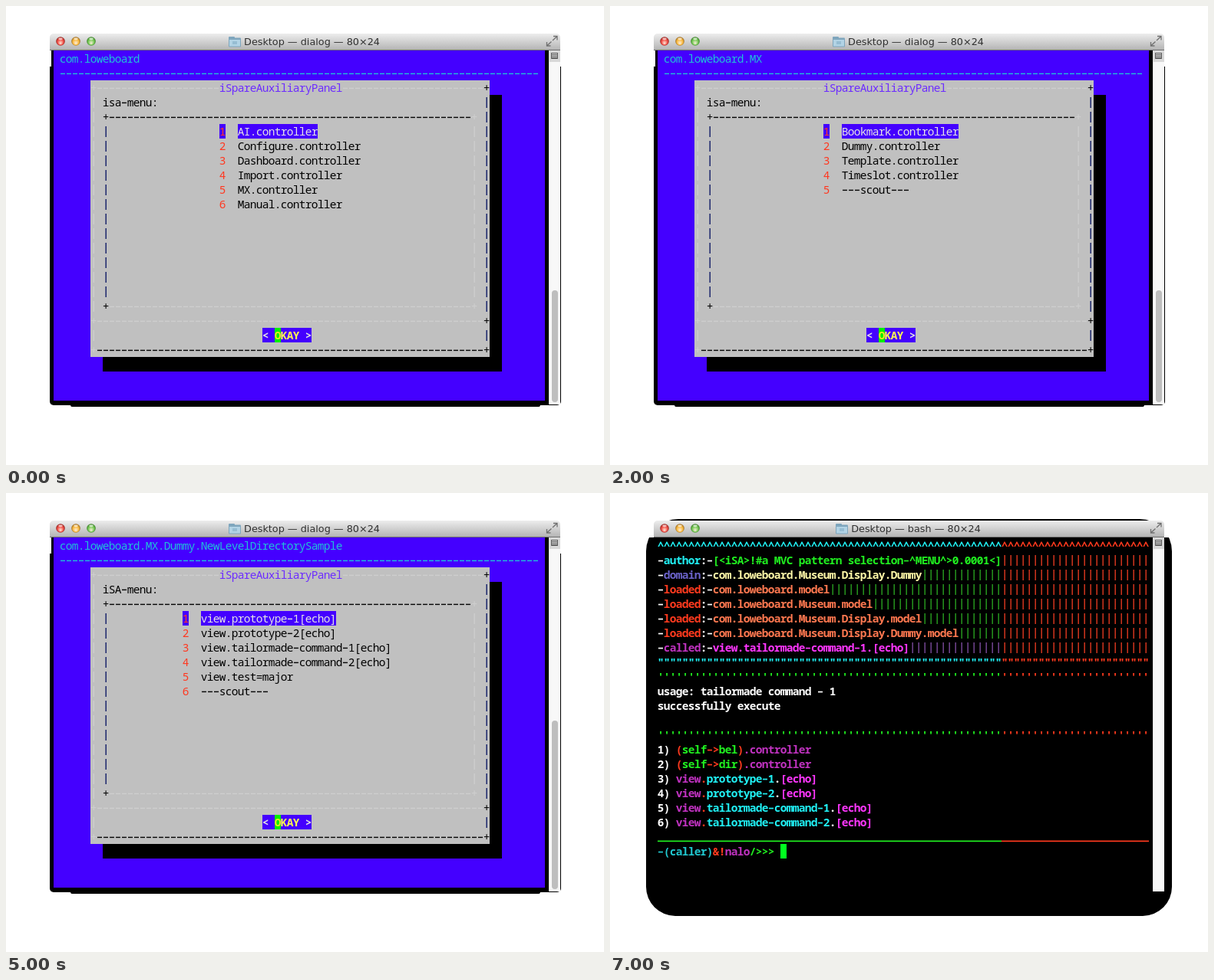
Recreate the animation shown at these times as an HTML page with a canvas. Size 779x599 px, loop 8 s.

```html
<!DOCTYPE html>
<html lang="en">
<head>
<meta charset="utf-8">
<title>Terminal menu</title>
<style>
html, body { margin: 0; width: 100%; height: 100%; overflow: hidden; background: #fff; }
canvas { display: block; width: 779px; height: 599px; }
</style>
</head>
<body>
<canvas id="stage" width="779" height="599"></canvas>
<script>
const ctx = document.getElementById('stage').getContext('2d');
const CELL_W = 8, CELL_H = 19, LEFT = 62, TOP = 59;
const BLUE = '#4400ff', GRAY = '#c0c0c0', FAINT = '#cecece', NAVY = '#101c66', RED = '#ff3820';
const INK = {
  w: '#ffffff', c: '#20f0f4', t: '#20c8d0', g: '#20f020', d: '#28a020', r: '#ff3a1e',
  s: '#ff7850', y: '#fff8a8', b: '#6a62c8', p: '#c032c0', m: '#ff36ff', v: '#7a4a9c'
};

const mainItems = ['AI', 'Configure', 'Dashboard', 'Import', 'MX', 'Manual'].map(n => n + '.controller');
const mxItems = [...['Bookmark', 'Dummy', 'Template', 'Timeslot'].map(n => n + '.controller'), '---scout---'];
const views = ['prototype-1', 'prototype-2', 'tailormade-command-1', 'tailormade-command-2'];
const viewItems = views.map(n => `view.${n}[echo]`);
const root = { path: 'com.loweboard', label: 'isa-menu:', col: 27, thumb: 371, items: mainItems };
const mx = { ...root, path: root.path + '.MX', items: mxItems };
const dummy = {
  path: mx.path + '.Dummy', label: 'iSA-menu:', col: 20, thumb: 297,
  items: ['NewLevelDirectorySample.controller', ...viewItems, '---scout---']
};
const sample = {
  ...dummy, path: dummy.path + '.NewLevelDirectorySample', col: 21,
  items: [...viewItems, 'view.test=major', '---scout---']
};
const steps = [[root, 0], [root, 4], [mx, 0], [mx, 1], [dummy, 0], [sample, 0], [sample, 2], null];

const cellX = col => LEFT + col * CELL_W;
const cellY = row => TOP + row * CELL_H;

function rect(x, y, w, h, color) {
  ctx.fillStyle = color;
  ctx.fillRect(x, y, w, h);
}

function round(x, y, w, h, radii, color) {
  ctx.fillStyle = color;
  ctx.beginPath();
  ctx.roundRect(x, y, w, h, radii);
  ctx.fill();
}

function fillCells(col, row, count, color) {
  rect(cellX(col), cellY(row), count * CELL_W, CELL_H, color);
}

// Places each character in its terminal cell; line characters are drawn as strokes.
function print(col, row, text, color, bold = false) {
  ctx.font = `${bold ? 600 : 400} 14.5px "Noto Sans Mono", "DejaVu Sans Mono", monospace`;
  ctx.textAlign = 'center';
  ctx.textBaseline = 'alphabetic';
  ctx.fillStyle = color;
  [...text].forEach((ch, i) => {
    const x = cellX(col + i), y = cellY(row);
    if (ch === '-') ctx.fillRect(x + 1, y + 9.7, 6, bold ? 1.7 : 1.4);
    else if (ch === '|') ctx.fillRect(x + 3.5, y + 3, 1.4, 14);
    else if (ch === '_') ctx.fillRect(x, y + 14.5, 8, 1.7);
    else if (ch !== ' ') ctx.fillText(ch, x + 4, y + 15);
  });
}

function printInk(row, markup) {
  let col = 0;
  markup.split('{').slice(1).forEach(part => {
    const text = part.slice(2);
    print(col, row, text, INK[part[0]], true);
    col += text.length;
  });
  return col;
}

function printRule(row, ch, first) {
  print(0, row, ch.repeat(56), INK[first], true);
  print(56, row, ch.repeat(24), INK.r, true);
}

function titleBar(task, iconX) {
  const shade = ctx.createLinearGradient(0, 36, 0, 58);
  shade.addColorStop(0, '#ededed');
  shade.addColorStop(1, '#b2b2b2');
  round(57, 36, 665, 22, [5, 5, 0, 0], shade);
  rect(57, 57, 665, 1, '#707070');

  [['#f04a42', '#8a2420'], ['#f8b83c', '#946420'], ['#72c850', '#387828']].forEach(([color, rim], i) => {
    const x = 71 + i * 20;
    const glow = ctx.createRadialGradient(x, 49, 0, x, 46, 6);
    glow.addColorStop(0, '#fff0e0');
    glow.addColorStop(.65, color);
    glow.addColorStop(1, rim);
    ctx.fillStyle = glow;
    ctx.beginPath();
    ctx.arc(x, 46, 5.8, 0, 7);
    ctx.fill();
    ctx.fillStyle = 'rgba(255,255,255,.65)';
    ctx.beginPath();
    ctx.ellipse(x, 42.8, 2.8, 1.4, 0, 0, 7);
    ctx.fill();
  });

  round(iconX, 40, 8, 5, 1, '#7fa6bd');
  round(iconX, 41.5, 16, 12, 1, '#7fa6bd');
  rect(iconX + 1, 44, 14, 8.5, '#b2d3e5');
  rect(iconX + 5, 46, 6, 4, '#96bdd3');

  ctx.font = '12.8px "DejaVu Sans", sans-serif';
  ctx.textAlign = 'center';
  ctx.fillStyle = '#303030';
  ctx.fillText(`Desktop — ${task} — 80×24`, 398.5, 51);

  ctx.strokeStyle = '#707070';
  ctx.lineWidth = 1.3;
  ctx.stroke(new Path2D('M712 45L718 39.5M713 39.5H718V44.5M710.5 46.5L704.5 52M704.5 47V52H709.5'));
}

function scrollBar(thumb) {
  rect(707, 58, 15, 462, '#f8f8f8');
  rect(707, 58, 1, 462, '#e0e0e0');
  if (thumb) round(711, thumb, 8, 517 - thumb, 4, '#bebebe');
  rect(708, 58, 14, 15, '#d8d8d8');
  ctx.strokeStyle = '#606060';
  ctx.lineWidth = 1;
  ctx.strokeRect(710.5, 61.5, 8, 7);
  for (const y of [63, 65, 67]) rect(711, y, 7, 1, '#606060');
}

function frameLines() {
  print(6, 2, '+' + '-'.repeat(63), FAINT);
  print(8, 4, '+' + '-'.repeat(59), '#000');
  print(60 + 8, 4, '+', FAINT);
  print(8, 17, '+', '#000');
  print(9, 17, '-'.repeat(59) + '+', FAINT);
  print(6, 18, '+' + '-'.repeat(63), FAINT);
  print(6, 20, '+', FAINT);
  print(7, 20, '-'.repeat(63), '#000');
  for (let row = 2; row <= 20; row++) {
    if ([2, 18, 20].includes(row)) {
      print(70, row, '+', '#000');
      continue;
    }
    print(6, row, '|', FAINT);
    print(70, row, '|', NAVY);
    if (row > 4 && row < 17) {
      print(8, row, '|', NAVY);
      print(68, row, '|', FAINT);
    }
  }
}

function dialogScreen(menu, selected) {
  rect(59, 58, 648, 24, '#000');
  round(57, 79, 666, 442, [0, 0, 5, 5], '#000');
  round(84, 519, 612, 4, 2, '#000');
  rect(62, 58, 640, 457, BLUE);
  scrollBar(menu.thumb);
  titleBar('dialog', 290);

  print(1, 0, menu.path, '#20c0d8');
  print(1, 1, '-'.repeat(78), '#20c0d8');
  rect(126, 116, 520, 361, '#000');
  rect(110, 97, 520, 361, GRAY);
  frameLines();
  fillCells(27, 2, 20, GRAY);
  print(27, 2, 'iSpareAuxiliaryPanel', '#6c2cff');
  print(8, 3, menu.label, '#000');

  menu.items.forEach((item, i) => {
    const row = 5 + i, active = i === selected;
    if (active) {
      fillCells(menu.col, row, 1, BLUE);
      fillCells(menu.col + 3, row, item.length, BLUE);
    }
    print(menu.col, row, String(i + 1), RED);
    print(menu.col + 3, row, item, active ? '#e4e4e4' : '#000');
  });

  fillCells(34, 19, 8, BLUE);
  fillCells(36, 19, 1, '#00f000');
  print(34, 19, '<      >', '#e4e4e4', true);
  print(36, 19, 'O', '#e8e820', true);
  print(37, 19, 'KAY', '#ffff50', true);
}

function shellScreen() {
  round(47, 34, 685, 518, [42, 42, 38, 38], '#000');
  rect(47, 34, 10, 24, '#fff');
  rect(722, 34, 10, 24, '#fff');
  scrollBar();
  titleBar('bash', 294);

  printRule(0, '^', 'c');
  const base = 'com.loweboard';
  const report = [
    ['{w}-{c}author{w}:-{g}[<iSA>!#a MVC pattern selection-^MENU^>0.0001<]', 'd'],
    [`{w}-{b}domain{w}:-{y}${base}.Museum.Display.Dummy`, 'd'],
    ...['', '.Museum', '.Museum.Display', '.Museum.Display.Dummy']
      .map(part => [`{w}-{r}loaded{w}:-{s}${base}${part}.model`, 'd']),
    ['{w}-{p}called{w}:-{m}view.tailormade-command-1.[echo]', 'v']
  ];
  report.forEach(([markup, filler], i) => {
    const end = printInk(i + 1, markup);
    print(end, i + 1, '|'.repeat(56 - end), INK[filler]);
    print(56, i + 1, '|'.repeat(24), '#e03820');
  });
  printRule(8, '"', 'c');
  printRule(9, "'", 'g');
  print(0, 10, 'usage: tailormade command - 1', INK.w, true);
  print(0, 11, 'successfully execute', INK.w, true);
  printRule(13, "'", 'g');

  const choices = [
    ...['bel', 'dir'].map(n => `{r}({g}self{r}->{g}${n}{r}){p}.controller`),
    ...views.map(n => `{p}view{r}.{c}${n}{w}.{m}[echo]`)
  ];
  choices.forEach((choice, i) => printInk(14 + i, `{w}${i + 1}) ${choice}`));
  printRule(20, '_', 'g');
  printInk(21, '{t}-(caller){r}&!{p}nalo{g}/>>>');
  fillCells(20, 21, 1, '#00ff20');
}

function draw(now) {
  const step = steps[Math.floor((now % 8000) / 1000)];
  rect(0, 0, 779, 599, '#fff');
  if (step) dialogScreen(...step);
  else shellScreen();
}

const start = performance.now();
function tick() {
  draw(performance.now() - start);
  requestAnimationFrame(tick);
}
tick();
</script>
</body>
</html>
```
